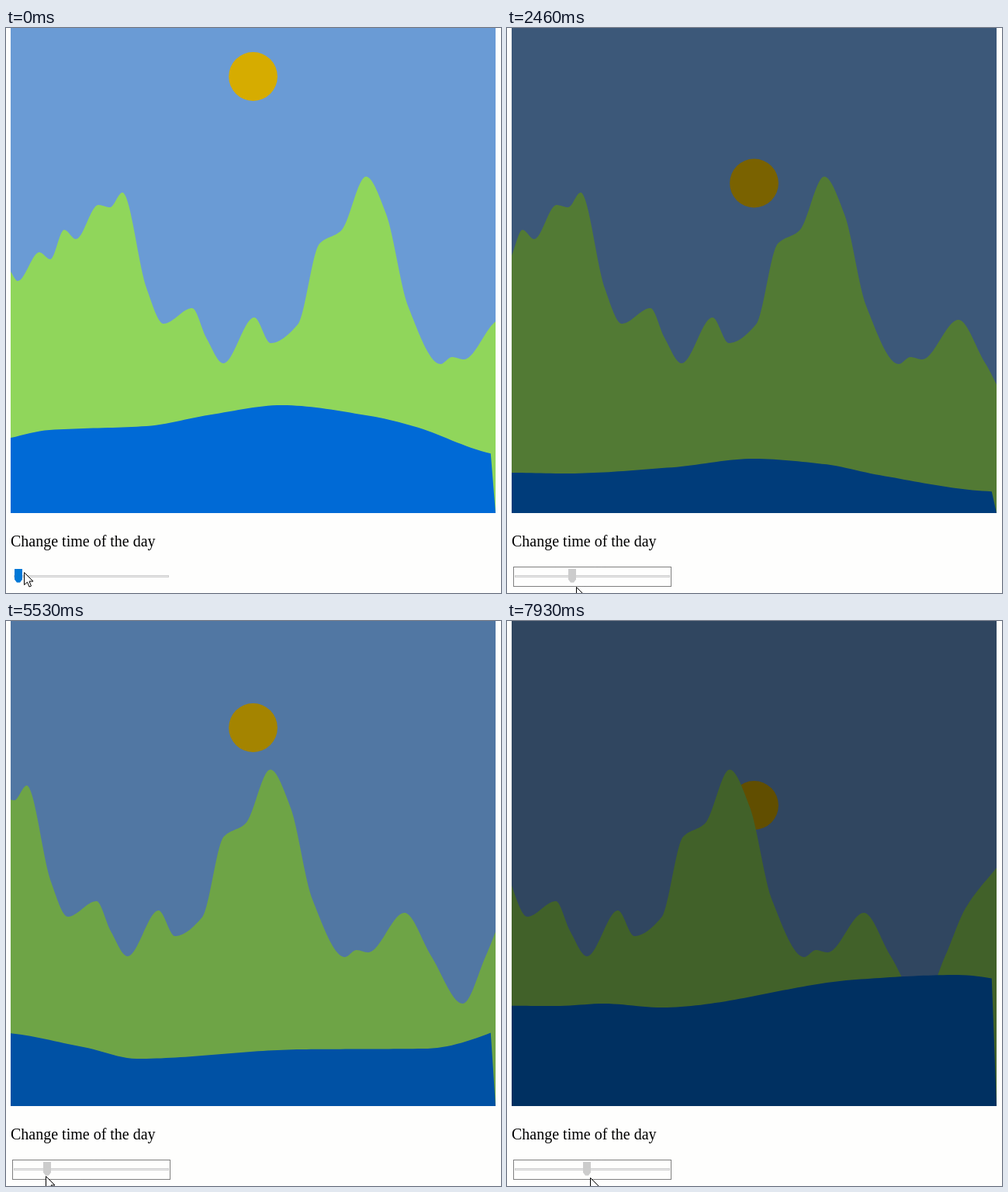
Write an HTML page with a canvas that moves like this. It is 638 px wide and 728 px high and loops after 8000 ms.

```html
<!DOCTYPE html>
<html lang="en">
<head>
<meta charset="utf-8">
<title>Time of the day</title>
<style>
  html, body { margin: 0; width: 100%; height: 100%; overflow: hidden; background: #fefefd; }
  canvas { display: block; position: absolute; left: 0; top: 0; }
  p { position: absolute; left: 6px; top: 650px; margin: 0; color: #000; white-space: nowrap;
      font: 20px/23px "Liberation Serif", "Times New Roman", serif; }
</style>
</head>
<body>
<canvas id="stage" width="638" height="728"></canvas>
<p>Change time of the day</p>
<script>
const ctx = document.getElementById('stage').getContext('2d');
const LOOP = 8000, STEP = 200 / 3;
const LEFT = 6, SIZE = 625, RIGHT = LEFT + SIZE;
const TICK_RATE = 0.0595;     // scenery ticks per millisecond
const CELL = 6.25;            // water moves one cell per tick
const RIDGE_SPEED = 0.375;    // ridge movement per tick
const PRESS = 1100;           // moment the slider is grabbed

const SKY = [106, 155, 213], SUN = [214, 172, 0];
const LAND = [144, 214, 91], WATER = [0, 106, 214];

// Peaks, dips and shoulders; everything between them is eased
const ridge = curve([
  [6, 314], [15, 326], [43, 289], [57, 298], [75, 260], [90, 272], [119, 228], [134, 231],
  [150, 212], [181, 335], [203, 381], [240, 361], [258, 399], [280, 432], [320, 373],
  [341, 406], [376, 382], [404, 278], [432, 261], [464, 191.5], [490, 240], [518, 358],
  [560, 433], [575, 424], [590, 427], [637, 376], [671, 431], [712, 493], [742, 431],
  [768, 370], [812, 313]
]);
const shore = curve([
  [6, 528], [55, 518], [180, 513], [265, 498], [355, 486], [470, 500], [525, 513], [629, 549],
  [848, 576], [928, 573], [993, 574], [1133, 566], [1236, 555], [1328, 562], [1398, 576],
  [1540, 597], [1640, 600], [2040, 530], [2156, 549], [2226, 564], [2436, 552], [2597, 551],
  [2775, 501], [2845, 495], [3015, 496], [3075, 493], [3148, 498], [3400, 462], [3530, 456],
  [3620, 468]
]);

// Monotone cubic through the points: flat at every peak and dip
function curve(points) {
  const last = points.length - 1;
  const slope = i => (points[i + 1][1] - points[i][1]) / (points[i + 1][0] - points[i][0]);
  const tangents = points.map((_, i) => {
    if (i === 0) return slope(0);
    if (i === last) return slope(last - 1);
    const a = slope(i - 1), b = slope(i);
    return a * b <= 0 ? 0 : 2 * a * b / (a + b);
  });
  return x => {
    let i = 0;
    while (i < last - 1 && points[i + 1][0] < x) i++;
    const [x0, y0] = points[i], [x1, y1] = points[i + 1];
    const w = x1 - x0, s = (x - x0) / w, r = 1 - s;
    return y0 * (1 + 2 * s) * r * r + y1 * s * s * (3 - 2 * s)
      + w * s * r * (tangents[i] * r - tangents[i + 1] * s);
  };
}

const ramp = (t, from, to) => Math.min(1, Math.max(0, (t - from) / (to - from)));

// Slider: a small click, a drag to night, back to day, then towards night again
function dragAt(t) {
  return (t >= PRESS ? 10 : 0) + 250 * ramp(t, 1760, 3520)
    - 260 * ramp(t, 4230, 5920) + 150 * ramp(t, 6347, 8047);
}

const thumbAt = value => 16 + value * 0.622;

// The pointer follows the thumb loosely and overshoots the left end
function pointerAt(t) {
  const toDusk = ramp(t, 1760, 2460), toNight = ramp(t, 2460, 3700);
  const lag = (t < PRESS ? 7 : 2) + 2 * toDusk - 6 * toNight + 6 * ramp(t, 6200, 7930);
  const overshoot = 12 * Math.sin(Math.PI * ramp(t, 5920, 6350));
  return [
    thumbAt(dragAt(t)) + lag - overshoot,
    701 + 7 * ramp(t, 930, 1460) + 12 * toDusk + 6 * toNight
      - 22 * ramp(t, 4230, 6800) + 14 * ramp(t, 6800, 8000)
  ].map(Math.round);
}

function shade(rgb, value) {
  const k = Math.max(0, 255 - value) / 255;
  return `rgb(${rgb.map(c => Math.round(c * k)).join(',')})`;
}

function polygon(points, fill, stroke) {
  ctx.beginPath();
  points.forEach(([x, y]) => ctx.lineTo(x, y));
  ctx.closePath();
  ctx.fillStyle = fill;
  ctx.fill();
  if (stroke) {
    ctx.strokeStyle = stroke;
    ctx.stroke();
  }
}

function drawScene(tick, value) {
  ctx.save();
  ctx.beginPath();
  ctx.rect(LEFT, 0, SIZE, SIZE);
  ctx.clip();
  ctx.fillStyle = shade(SKY, value);
  ctx.fillRect(LEFT, 0, SIZE, SIZE);

  ctx.fillStyle = shade(SUN, value);
  ctx.beginPath();
  ctx.arc(318.5, 62.5 + value * 1.25, 31.4, 0, Math.PI * 2);
  ctx.fill();

  const land = [[LEFT, SIZE]];
  for (let x = LEFT; x <= RIGHT; x += 1.25) land.push([x, ridge(x + tick * RIDGE_SPEED)]);
  land.push([RIGHT, SIZE]);
  polygon(land, shade(LAND, value));

  const water = [[LEFT, SIZE]];
  for (let i = 0; i < 100; i++) {
    const x = LEFT + i * CELL;
    water.push([x, shore(x + tick * CELL)]);
  }
  water.push([RIGHT, SIZE]);
  polygon(water, shade(WATER, value));
  ctx.restore();
}

function drawSlider(value, active) {
  ctx.fillStyle = '#cfcfcf';
  ctx.fillRect(10, 705, 200, 3);
  ctx.fillStyle = '#e9eaea';
  ctx.fillRect(11, 706, 198, 1);

  const x = Math.round(thumbAt(value));
  polygon([[x - 5, 697], [x + 5, 697], [x + 5, 710.5], [x + 2, 714.5], [x - 2, 714.5], [x - 5, 710.5]],
    active ? '#cccccc' : '#0078d7');

  if (active) {
    ctx.strokeStyle = '#000';
    ctx.lineWidth = 1;
    ctx.setLineDash([1, 1]);
    ctx.strokeRect(8.5, 694.5, 203, 25);
    ctx.setLineDash([]);
  }
}

function drawPointer([x, y]) {
  const arrow = [[0, 0], [0, 16], [4, 12.5], [6.5, 18.5], [9, 17.5], [6.5, 11.5], [11.5, 11.5]];
  ctx.lineWidth = 1;
  polygon(arrow.map(([dx, dy]) => [x + dx + 0.5, y + dy + 0.5]), '#fff', '#000');
}

function draw(now) {
  // The picture advances fifteen times a second
  const t = Math.floor((now % LOOP + 6.7) / STEP) * STEP % LOOP;
  const value = Math.round(dragAt(t) / 10) * 10;
  ctx.fillStyle = '#fefefd';
  ctx.fillRect(0, 0, 638, 728);
  drawScene(Math.round(t * TICK_RATE), value);
  drawSlider(value, t >= PRESS);
  drawPointer(pointerAt(t));
}

const start = performance.now();
function loop() {
  draw(performance.now() - start);
  requestAnimationFrame(loop);
}
loop();
</script>
</body>
</html>
```
